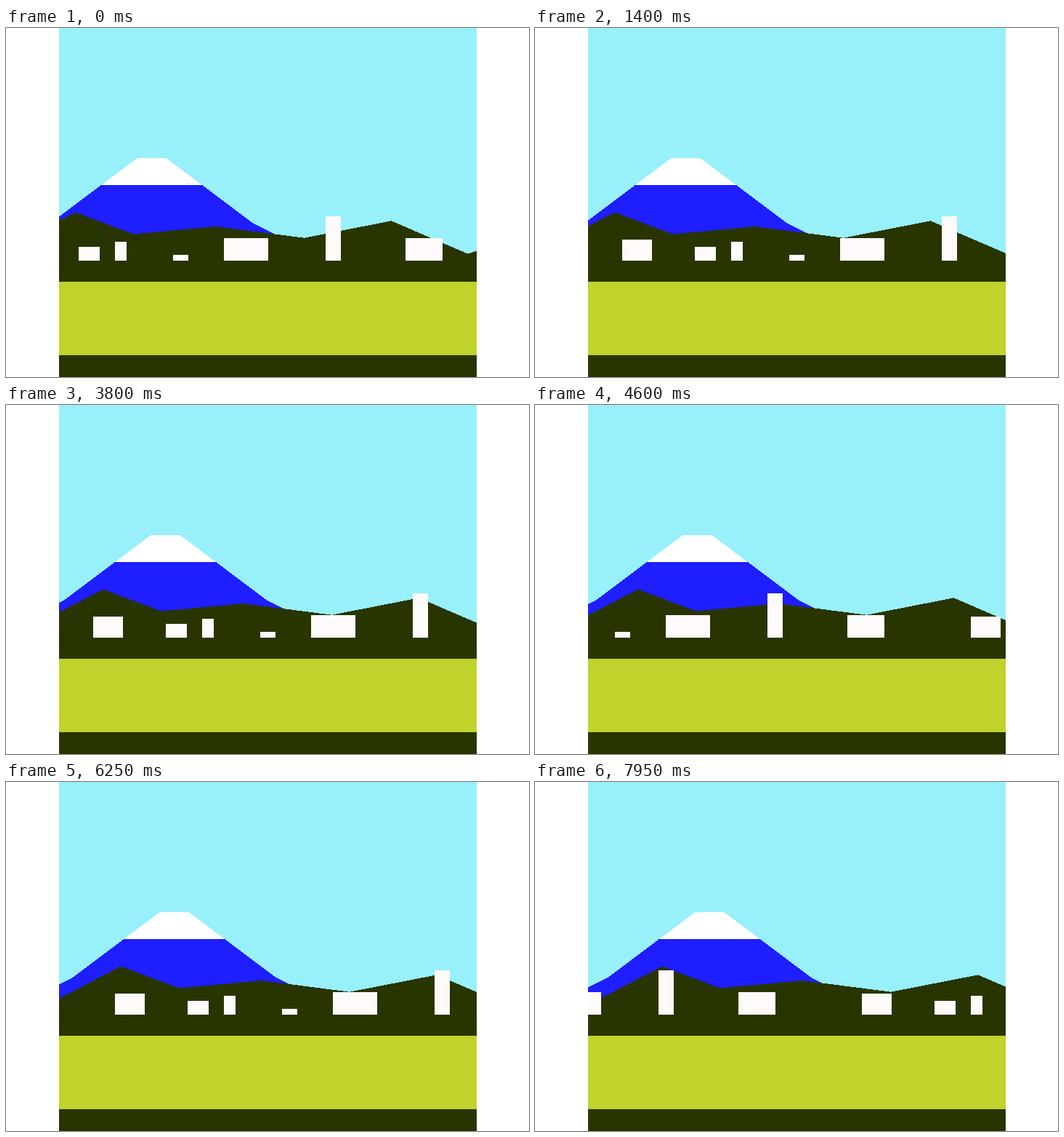
These frames come from a looping animation (720 by 480 pixels, 8000 ms). An HTML page with a canvas:

```html
<!DOCTYPE html>
<html lang="en">
<head>
<meta charset="utf-8">
<title>Train window</title>
<style>
  html, body { margin: 0; width: 100%; height: 100%; overflow: hidden; background: #fff; }
  canvas { display: block; width: 720px; height: 480px; }
</style>
</head>
<body>
<canvas id="stage" width="720" height="480"></canvas>
<script>
const ctx = document.getElementById('stage').getContext('2d');

const LOOP = 8000, STEP = 50;
const LEFT = 73, RIGHT = 648;
const TOWN_SPAN = 720, TOWN_BASE = 320, FIELD_TOP = 349, FIELD_END = 450;
const SNOW_LINE = 216;

const SKY = '#98f0fa', BLUE = '#1e1eff', SNOW = '#ffffff';
const DARK = '#283500', FIELD = '#c0d22c', WALL = '#fffafa';

function box(x, y, w, h, color) {
  ctx.fillStyle = color;
  ctx.fillRect(x, y, w, h);
}

// Flat summit, steep flanks, gentler feet
function mountain(x) {
  const d = Math.abs(x - 200);
  const flank = Math.min(Math.max(d - 20, 0), 120);
  const foot = Math.max(d - 140, 0);
  return 179 + flank * 0.75 + foot * 0.5;
}

// Straight slopes between alternating peaks and valleys
const corners = [[-20, 313.5], [95, 253.5], [175, 283.5], [288, 273],
                 [410, 288.7], [530, 265.3], [635, 310.5], [735, 280.5]];

function hills(x) {
  const i = corners.findIndex(c => c[0] > x);
  const [ax, ay] = corners[i - 1], [bx, by] = corners[i];
  return ay + (by - ay) * (x - ax) / (bx - ax);
}

// Whole pixel columns keep the slopes hard-edged
function ridge(height, shift, bottom, color) {
  for (let x = LEFT; x < RIGHT; x++) {
    const top = Math.ceil(height(x - shift) - 0.5);
    if (top < bottom) box(x, top, 1, bottom - top, color);
  }
}

function town(shift) {
  const building = (x, w, h) => {
    const px = (x + shift) % TOWN_SPAN;
    for (const left of [px, px - TOWN_SPAN]) box(left, TOWN_BASE - h, w, h, WALL);
  };
  building(0, 41, 29);
  building(100, 29, 19);
  building(150, 16, 26);
  building(230, 21, 8);
  building(300, 61, 31);
  building(440, 21, 61);
  building(550, 51, 31);
}

function draw(tick) {
  const width = RIGHT - LEFT;
  box(0, 0, 720, 480, '#fff');
  ctx.save();
  ctx.beginPath();
  ctx.rect(LEFT, 0, width, 480);
  ctx.clip();

  box(LEFT, 0, width, 480, SKY);
  ridge(mountain, tick * 0.25, FIELD_TOP, BLUE);
  ridge(mountain, tick * 0.25, SNOW_LINE, SNOW);
  ridge(hills, tick * 0.5, FIELD_TOP, DARK);
  town(tick * 30);
  box(LEFT, FIELD_TOP, width, FIELD_END - FIELD_TOP, FIELD);
  box(LEFT, FIELD_END, width, 480 - FIELD_END, DARK);

  ctx.restore();
}

function frame() {
  draw(Math.floor(performance.now() % LOOP / STEP));
  requestAnimationFrame(frame);
}
frame();
</script>
</body>
</html>
```
